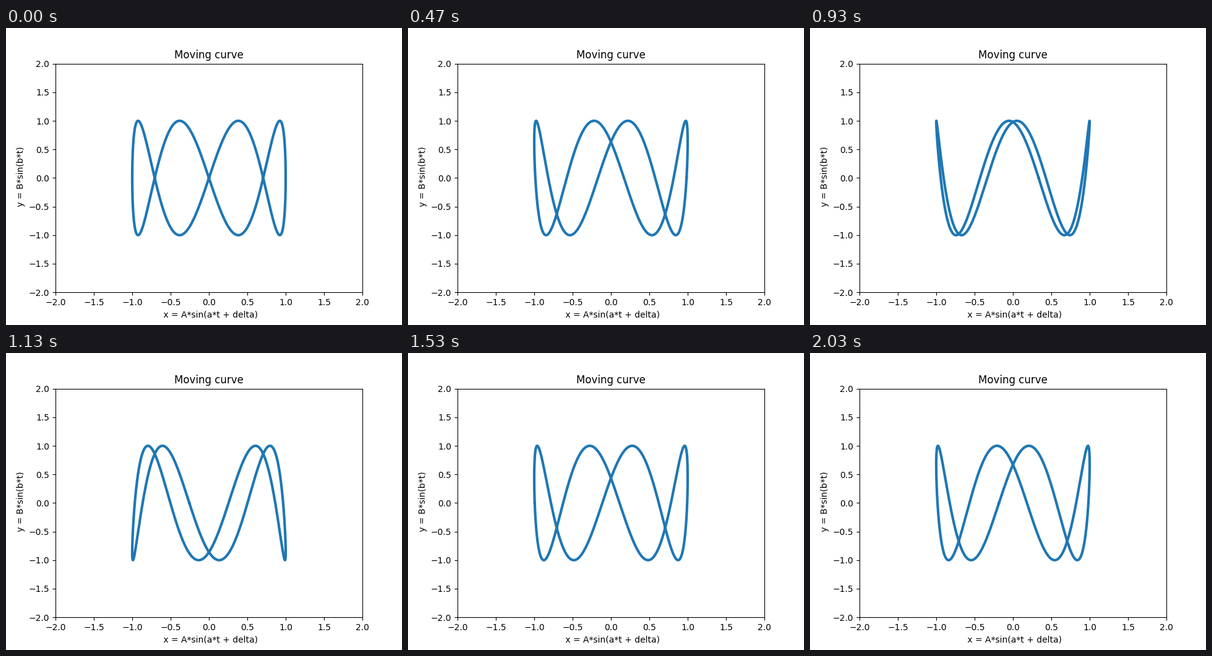
A matplotlib script for the animation above (2060 ms loop, 640x480 px).

```python
import numpy as np
import matplotlib.pyplot as plt
from matplotlib.animation import FuncAnimation

TICK_MS = 10
LOOP_MS = 2060
FPS = 30
PHASE_STEP = 0.1
A, B = 1, 1
a, b = 1, 4

plt.rcParams["font.family"] = "DejaVu Sans"

fig, ax = plt.subplots(figsize=(6.4, 4.8), dpi=100)
ax.set(xlim=(-2, 2), ylim=(-2, 2), title="Moving curve",
       xlabel=" x = A*sin(a*t + delta)", ylabel=" y = B*sin(b*t)")

t = np.linspace(0, 2 * np.pi, 1000)
line, = ax.plot([], [], lw=3, color="tab:blue")


def update(tick):
    # The phase advances 30 times a second, snapped to 10 ms ticks.
    step = int((tick + 0.5) * TICK_MS * FPS / 1000)
    delta = PHASE_STEP * step
    line.set_data(A * np.sin(a * t + delta), B * np.sin(b * t))
    return line,


anim = FuncAnimation(fig, update, frames=LOOP_MS // TICK_MS,
                     interval=TICK_MS, repeat=True, repeat_delay=0)
plt.show()
```
